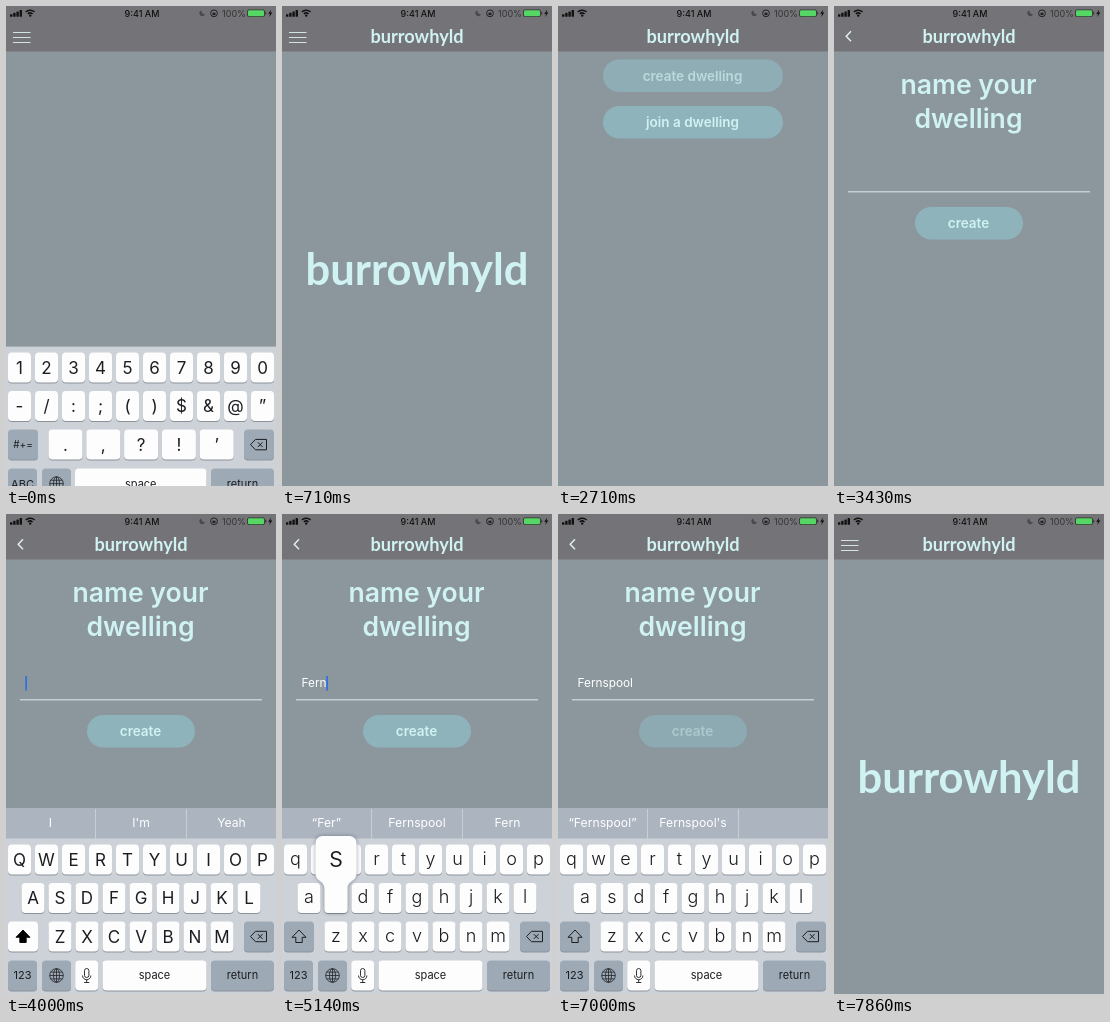
Recreate the animation shown at these times as an HTML page with a canvas. Size 270 by 480 pixels, loop 8000 ms.

```html
<!DOCTYPE html>
<html lang="en">
<head>
<meta charset="utf-8">
<title>Dwelling app</title>
<style>
html, body { margin: 0; width: 100%; height: 100%; overflow: hidden; background: #8b979d; }
canvas { display: block; width: 270px; height: 480px; }
</style>
</head>
<body>
<canvas id="stage"></canvas>
<script>
const W = 270, H = 480, LOOP = 8000, FPS = 7;
const canvas = document.getElementById('stage');
const c = canvas.getContext('2d');
const dpr = window.devicePixelRatio || 1;
canvas.width = W * dpr;
canvas.height = H * dpr;

const SANS = 'Inter, Roboto, sans-serif';
const BRAND = 'burrowhyld', WORD = 'Fernspool';
const BODY = '#8b979d', BAR = '#747478', PILL = '#8fb3bb', PALE = '#d0f2f2';
const KEYS_BG = '#cdd2d9', GREY_KEY = '#9da9b5', INK = '#1b1d20';
const ROWS = [330.5, 369, 407.5, 446.5];

const RESET_1 = -60, PUSH_1 = 1002, PUSH_2 = 2830, FOCUS = 3560, RESET_2 = 7230;
const TYPED = [4200, 4560, 4800, 4990, 5200, 5420, 5640, 5860, 6090];
const HINTS = [
  ['I', "I'm", 'Yeah'], ['“F”', 'For', 'From'], ['“Fe”', 'Few', 'Feel'],
  ['“Fer”', WORD, 'Fern'], ['“Fern”', 'Ferns', WORD]
];

const clamp = v => Math.max(0, Math.min(1, v));
const ramp = (t, a, b) => clamp((t - a) / (b - a));
const smooth = v => v * v * (3 - 2 * v);
const pulse = (t, a, b) => ramp(t, a, a + 90) * (1 - ramp(t, b, b + 120));
const typedAt = t => TYPED.filter(u => u <= t).length;

// cubic-bezier(.2833, .99, .31833, .99)
function glide(x) {
  if (x <= 0 || x >= 1) return clamp(x);
  const curve = (s, a, b) => 3 * (1 - s) * (1 - s) * s * a + 3 * (1 - s) * s * s * b + s * s * s;
  let lo = 0, hi = 1;
  for (let i = 0; i < 24; i++) {
    const mid = (lo + hi) / 2;
    if (curve(mid, 0.2833, 0.31833) < x) lo = mid; else hi = mid;
  }
  return curve(lo, 0.99, 0.99);
}

function rect(x, y, w, h, fill) {
  c.fillStyle = fill;
  c.fillRect(x, y, w, h);
}

function round(x, y, w, h, r, fill) {
  c.beginPath();
  c.roundRect(x, y, w, h, r);
  c.fillStyle = fill;
  c.fill();
}

function text(str, x, y, size, fill, weight = 400, align = 'center') {
  c.font = `${weight} ${size}px ${SANS}`;
  c.textAlign = align;
  c.fillStyle = fill;
  c.fillText(str, x, y);
}

function line(points, color, width, close) {
  c.beginPath();
  points.forEach(([x, y], i) => i ? c.lineTo(x, y) : c.moveTo(x, y));
  if (close) c.closePath();
  c.strokeStyle = color;
  c.lineWidth = width;
  c.stroke();
}

function faded(alpha, draw) {
  if (alpha <= 0) return;
  c.save();
  c.globalAlpha *= alpha;
  draw();
  c.restore();
}

function brand(y, size) {
  c.font = `700 ${size}px Lato, sans-serif`;
  c.textAlign = 'center';
  c.fillStyle = PALE;
  c.fillText(BRAND, 135, y);
}

function pill(label, x, y, w, press) {
  faded(1 - 0.3 * press, () => round(x, y, w, 32.5, 16.25, PILL));
  faded(1 - 0.55 * press, () => text(label, x + w / 2 - 0.5, y + 21, 13.5, PALE, 600));
}

// Pages

function homePage(since) {
  rect(0, 45, W, H, BODY);
  faded(ramp(since, 120, 420), () => brand(279, 43.5));
}

function menuPage(t) {
  rect(0, 45, W, H, BODY);
  pill('create dwelling', 45, 53.5, 180, pulse(t, 2660, 2800));
  pill('join a dwelling', 45, 100, 180, 0);
}

function namePage(t) {
  rect(0, 45, W, H, BODY);
  text('name your', 134.5, 88, 26.6, PALE, 600);
  text('dwelling', 134.5, 122, 26.6, PALE, 600);
  rect(14, 185, 242, 1.5, '#c3ced1');
  const value = WORD.slice(0, typedAt(t));
  text(value, 19.5, 173, 11.8, '#fff', 400, 'left');
  const last = TYPED.filter(u => u <= t).pop() || FOCUS;
  if (t >= FOCUS && (t - last) % 1000 < 500) {
    rect(19.3 + c.measureText(value).width, 162, 1.7, 14.5, '#2f70e0');
  }
  pill('create', 81, 201, 108, pulse(t, 6860, 7130));
}

function push(p, from, to) {
  if (p >= 1) return to();
  c.save();
  c.translate(-W * 0.3 * p, 0);
  from();
  c.restore();
  if (p <= 0) return;
  const x = W * (1 - p);
  const shade = c.createLinearGradient(x - 14, 0, x, 0);
  shade.addColorStop(0, 'rgba(20,40,48,0)');
  shade.addColorStop(0.5, 'rgba(20,40,48,.2)');
  shade.addColorStop(1, 'rgba(20,40,48,.32)');
  rect(x - 14, 45, 14, H, shade);
  c.save();
  c.translate(x, 0);
  to();
  c.restore();
}

// Header

function statusBar() {
  for (let i = 0; i < 4; i++) round(4 + i * 3.2, 8.2 - i * 1.4, 2.4, 2.6 + i * 1.4, 0.6, '#111');
  c.strokeStyle = '#111';
  c.lineWidth = 1.4;
  for (const r of [3.2, 6]) {
    c.beginPath();
    c.arc(24.2, 10.2, r, -Math.PI * 0.76, -Math.PI * 0.24);
    c.stroke();
  }
  c.beginPath();
  c.arc(24.2, 9.6, 1.2, 0, 7);
  c.fillStyle = '#111';
  c.fill();
  text('9:41 AM', 136, 10.6, 9, '#111', 500);

  c.beginPath();
  c.arc(196.3, 7.2, 2.9, -Math.PI * 0.62, Math.PI * 0.12, true);
  c.quadraticCurveTo(195.5, 8, 195.4, 4.5);
  c.fillStyle = '#4a4a4e';
  c.fill();
  c.beginPath();
  c.arc(208, 7.3, 3.4, 0, 7);
  c.strokeStyle = '#222';
  c.lineWidth = 1;
  c.stroke();
  rect(206.5, 6.7, 3, 2.4, '#222');
  text('100%', 228, 10.6, 9, '#333');

  round(241.2, 3.5, 17.6, 7.6, 1.8, '#333');
  round(242, 4.3, 16, 6, 1.2, '#55d665');
  rect(259.2, 5.8, 1, 2.8, '#333');
  c.beginPath();
  [[265.2, 3.6], [262.2, 7.8], [264, 7.8], [263.2, 11], [266.4, 6.6], [264.5, 6.6]]
    .forEach(([x, y]) => c.lineTo(x, y));
  c.fillStyle = '#111';
  c.fill();
}

function header(title, burger, back) {
  rect(0, 0, W, 45.5, BAR);
  statusBar();
  faded(title, () => brand(37, 18.2));
  faded(burger, () => [26.5, 31.5, 36.5].forEach(y => rect(7, y - 0.5, 17.5, 1, '#d3e2e3')));
  faded(back, () => line([[17, 25.2], [12.2, 30.2], [17, 35.2]], '#e4f2f2', 1.4));
}

// Keyboard

function cap(x, y, w, fill = '#fdfdfe') {
  round(x, y + 1, w, 30, 4, '#8c9299');
  round(x, y, w, 30, 4, fill);
}

function key(label, x, y, w, size, fill, weight) {
  cap(x, y, w, fill);
  text(label, x + w / 2, y + 15 + size * 0.36, size, INK, weight);
}

function globe(x, y) {
  c.strokeStyle = INK;
  c.lineWidth = 0.75;
  for (const r of [6.8, 3]) {
    c.beginPath();
    c.ellipse(x, y, r, 6.8, 0, 0, 7);
    c.stroke();
  }
  line([[x, y - 6.8], [x, y + 6.8]], INK, 0.75);
  for (const [d, r] of [[-3.4, 5.8], [0, 6.8], [3.4, 5.8]]) {
    line([[x - r, y + d], [x + r, y + d]], INK, 0.75);
  }
}

function mic(x, y) {
  c.strokeStyle = INK;
  c.lineWidth = 0.9;
  c.beginPath();
  c.roundRect(x - 2.2, y - 7, 4.4, 9, 2.2);
  c.stroke();
  c.beginPath();
  c.arc(x, y, 4.2, 0, Math.PI);
  c.stroke();
  line([[x, y + 4.2], [x, y + 7]], INK, 0.9);
  line([[x - 2.6, y + 7], [x + 2.6, y + 7]], INK, 0.9);
}

function deleteKey(y) {
  cap(238, y, 30, GREY_KEY);
  const m = y + 15;
  line([[244.5, m], [249.5, m - 5.2], [260.5, m - 5.2], [260.5, m + 5.2], [249.5, m + 5.2]], INK, 1, true);
  line([[251.8, m - 2.4], [256.6, m + 2.4]], INK, 1);
  line([[256.6, m - 2.4], [251.8, m + 2.4]], INK, 1);
}

function shiftKey(y, on) {
  cap(2, y, 30, on ? '#fdfdfe' : GREY_KEY);
  const m = y + 15;
  line([[17, m - 6.5], [24, m + 0.8], [20.2, m + 0.8], [20.2, m + 6], [13.8, m + 6],
    [13.8, m + 0.8], [10, m + 0.8]], INK, 1, true);
  if (on) {
    c.fillStyle = '#000';
    c.fill();
  }
}

function bottomRow(mode, withMic) {
  const y = ROWS[3];
  key(mode, 2, y, 29, 11, GREY_KEY);
  cap(36, y, 29, GREY_KEY);
  globe(50.5, y + 15);
  const left = withMic ? 96.5 : 69;
  if (withMic) {
    cap(69.2, y, 23);
    mic(80.7, y + 15);
  }
  key('space', left, y, 200.5 - left, 11);
  key('return', 205, y, 63, 11, GREY_KEY);
}

function popup(label, x, y) {
  const mid = x + 11.5, left = Math.max(1, Math.min(W - 42, mid - 20.5)), right = left + 41;
  const top = y - 47;
  c.save();
  c.shadowColor = 'rgba(40,50,60,.45)';
  c.shadowBlur = 4 * dpr;
  c.beginPath();
  c.moveTo(left + 7, top);
  c.arcTo(right, top, right, top + 8, 7);
  c.lineTo(right, y - 10);
  c.bezierCurveTo(right, y - 1, x + 23, y - 3, x + 23, y + 6);
  c.arcTo(x + 23, y + 30, x + 16, y + 30, 4);
  c.arcTo(x, y + 30, x, y + 24, 4);
  c.lineTo(x, y + 6);
  c.bezierCurveTo(x, y - 3, left, y - 1, left, y - 10);
  c.arcTo(left, top, left + 7, top, 7);
  c.fillStyle = '#fdfdfe';
  c.fill();
  c.restore();
  text(label, left + 20.5, top + 31, 28, INK, 300);
}

function letterBoard(t) {
  const n = typedAt(t), upper = n === 0;
  rect(0, 294, W, 31, '#abb4bf');
  rect(0, 324.5, W, 160, KEYS_BG);
  rect(89, 295, 1, 30, '#c9ced5');
  rect(180, 295, 1, 30, '#c9ced5');
  const seen = typedAt(t - 190), part = `“${WORD.slice(0, seen)}”`;
  const hints = HINTS[seen] || [part, seen === WORD.length ? WORD + "'s" : WORD, ''];
  hints.forEach((h, i) => text(h, 44.5 + i * 90.5, 313, 12.2, '#fff'));

  const hit = TYPED.findIndex(u => t >= u - 130 && t < u);
  let bubble = null;
  [['qwertyuiop', 2], ['asdfghjkl', 15.5], ['zxcvbnm', 42.5]].forEach(([row, x0], r) => {
    [...row].forEach((ch, i) => {
      const x = x0 + i * 27, y = ROWS[r];
      const label = upper ? ch.toUpperCase() : ch;
      cap(x, y, 23);
      text(label, x + 11.5, y + (upper ? 21 : 20.3), upper ? 17 : 18, INK, upper ? 400 : 300);
      if (hit >= 0 && WORD[hit].toLowerCase() === ch) bubble = [label, x, y];
    });
  });
  shiftKey(ROWS[2], upper);
  deleteKey(ROWS[2]);
  bottomRow('123', true);
  if (bubble) popup(...bubble);
}

function symbolBoard() {
  rect(0, 324.5, W, 160, KEYS_BG);
  ['1234567890', '-/:;()$&@”'].forEach((row, r) =>
    [...row].forEach((ch, i) => key(ch, 2 + i * 27, ROWS[r], 23, 17)));
  key('#+=', 2, ROWS[2], 30, 10, GREY_KEY);
  [...'.,?!’'].forEach((ch, i) => key(ch, 42.5 + i * 37.8, ROWS[2], 34, 17));
  deleteKey(ROWS[2]);
  bottomRow('ABC', false);
}

function slid(offset, draw) {
  c.save();
  c.translate(0, offset);
  draw();
  c.restore();
}

function scene(t) {
  const p1 = glide(ramp(t, PUSH_1, PUSH_1 + 500));
  const p2 = glide(ramp(t, PUSH_2, PUSH_2 + 500));
  const reset = t >= RESET_2;
  const since = t - (reset ? RESET_2 : RESET_1);
  const gone = smooth(ramp(since, 0, 300));

  if (reset || t < PUSH_1) {
    homePage(since);
    header(ramp(since, 120, 420), reset ? 1 : 1 - 0.7 * pulse(t, 830, 990), 0);
  } else if (t < PUSH_2) {
    push(p1, () => homePage(since), () => menuPage(t));
    header(Math.max(1 - p1, p1), clamp(1 - 2 * p1), 0);
  } else {
    push(p2, () => menuPage(t), () => namePage(t));
    header(Math.max(1 - p2, p2), 0, p2);
  }

  if (reset) {
    if (gone < 1) slid(186 * gone, () => letterBoard(t));
  } else if (t >= FOCUS) {
    const up = 1 - Math.pow(1 - ramp(t, FOCUS, FOCUS + 340), 3);
    slid(186 * (1 - up), () => letterBoard(t));
  } else if (gone < 1) {
    slid(155 * gone, symbolBoard);
  }
}

function frame() {
  const now = performance.now() % LOOP;
  const t = Math.floor(now * FPS / 1000 + 0.04) * 1000 / FPS;
  c.setTransform(dpr, 0, 0, dpr, 0, 0);
  c.clearRect(0, 0, W, H);
  scene(t);
  requestAnimationFrame(frame);
}
requestAnimationFrame(frame);
</script>
</body>
</html>
```
